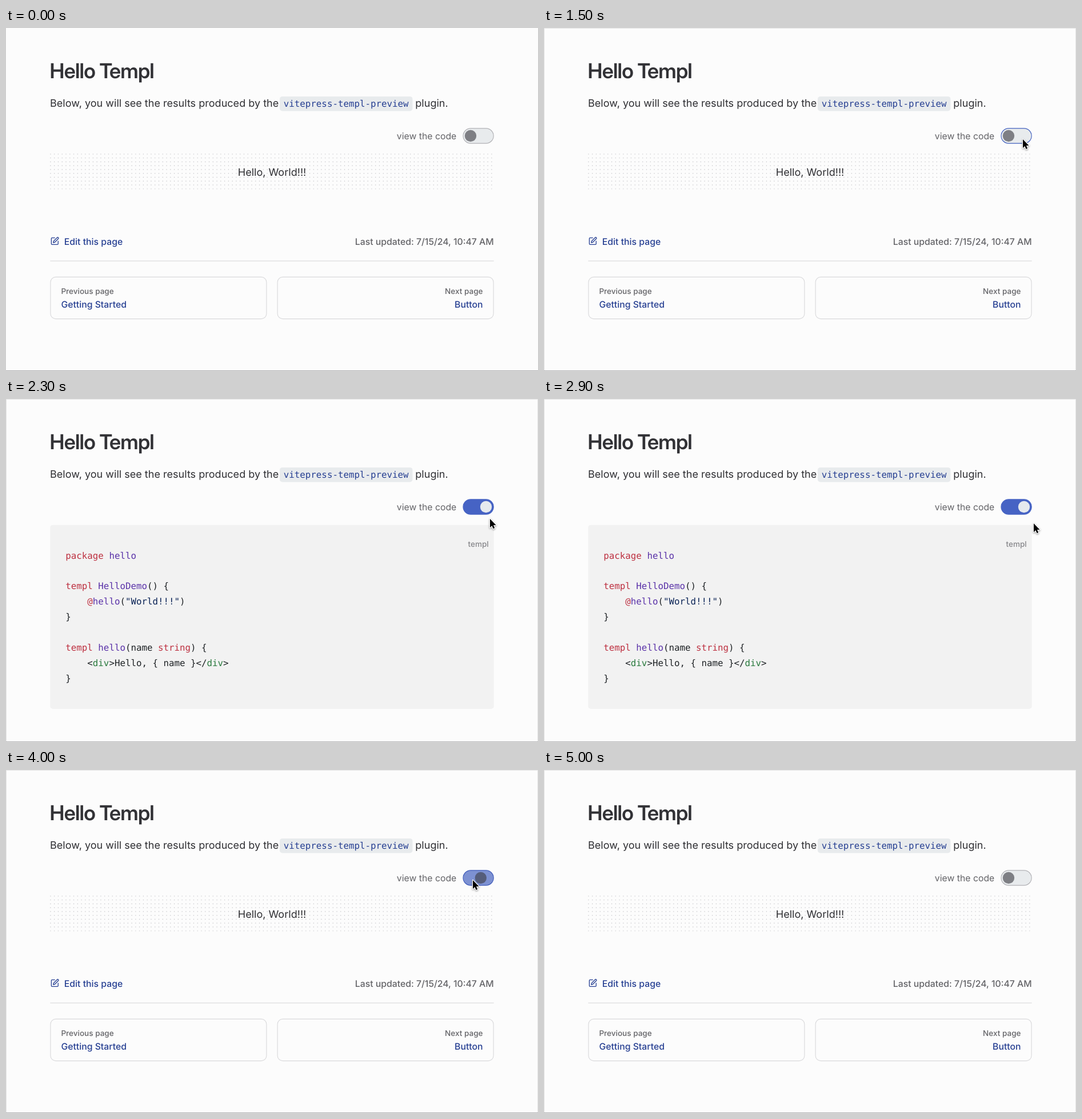
Recreate the animation shown at these times as an HTML page with a canvas. Size 931 px wide and 601 px high, loop 5100 ms.

```html
<!DOCTYPE html>
<html lang="en">
<head>
<meta charset="utf-8">
<title>Hello Templ</title>
<style>
  html, body { margin: 0; width: 100%; height: 100%; overflow: hidden; background: #fcfcfc; }
  canvas { position: absolute; left: 0; top: 0; display: block; }
  h1 {
    position: absolute; left: 76.6px; top: 52.8px; margin: 0; white-space: nowrap;
    font: 600 36.1px/45.1px "Inter Display", Inter, sans-serif;
    font-variation-settings: "opsz" 32;
    letter-spacing: -0.02em; color: #323236; text-rendering: geometricPrecision;
  }
</style>
</head>
<body>
<canvas id="stage" width="931" height="601"></canvas>
<h1>Hello Templ</h1>
<script>
const ctx = document.getElementById('stage').getContext('2d');
const LOOP = 5100, STEP = 100;
const ZOOM = 1.1286;               // page zoom applied to CSS sizes
const LEFT = 77.3, RIGHT = 853.7;

const SANS = 'Inter, sans-serif';
const MONO = '"DejaVu Sans Mono", monospace';
const C = {
  page: '#fcfcfc', text: '#2f2f33', muted: '#636367', brand: '#263f92',
  line: '#d9d9db', soft: '#e8ebed', panel: '#f2f2f2', label: '#86868a',
  red: '#bd3040', purple: '#5a32a8', navy: '#0a2356', green: '#2a7a3e', ink: '#1f2326'
};

// Each line: optional indent, then colour/text pairs
const CODE = [
  [0, 'red', 'package', 'purple', ' hello'],
  [0],
  [0, 'red', 'templ', 'purple', ' HelloDemo', 'ink', '() {'],
  [4, 'red', '@', 'purple', 'hello', 'ink', '(', 'navy', '"World!!!"', 'ink', ')'],
  [0, 'ink', '}'],
  [0],
  [0, 'red', 'templ', 'purple', ' hello', 'ink', '(name ', 'red', 'string', 'ink', ') {'],
  [4, 'ink', '<', 'green', 'div', 'ink', '>Hello, { name }</', 'green', 'div', 'ink', '>'],
  [0, 'ink', '}']
];

// Pointer routes: [time, x, y]; hidden outside each route
const ROUTES = [
  [[500, 870, 546], [600, 862, 380], [700, 857, 246], [900, 857, 246], [1000, 857, 210],
   [1200, 843, 199], [1500, 838, 195], [2000, 838, 195], [2100, 840, 198], [2300, 847, 210],
   [2400, 857, 218], [3000, 857, 218]],
  [[3500, 857, 211], [3600, 834, 202], [3700, 826, 197], [4000, 817, 193],
   [4200, 822, 192], [4300, 900, 193]]
];

const lerp = (a, b, k) => a + (b - a) * k;
const mix = (a, b, k) => `rgb(${a.map((v, i) => Math.round(lerp(v, b[i], k)))})`;

// CSS "ease": cubic-bezier(.25, .1, .25, 1)
function ease(x) {
  if (x <= 0) return 0;
  if (x >= 1) return 1;
  const bez = (p, q, s) => 3 * p * s * (1 - s) ** 2 + 3 * q * s * s * (1 - s) + s ** 3;
  let lo = 0, hi = 1;
  for (let i = 0; i < 20; i++) {
    const mid = (lo + hi) / 2;
    if (bez(.25, .25, mid) < x) lo = mid; else hi = mid;
  }
  return bez(.1, 1, lo);
}

function text(str, x, y, size, color, weight = 400, align = 'left', family = SANS) {
  ctx.font = `${weight} ${size * ZOOM}px ${family}`;
  ctx.textAlign = align;
  ctx.fillStyle = color;
  ctx.fillText(str, x, y);
}

function box(x, y, w, h, r, fill, stroke) {
  ctx.beginPath();
  ctx.roundRect(x, y, w, h, r);
  if (fill) { ctx.fillStyle = fill; ctx.fill(); }
  if (stroke) { ctx.strokeStyle = stroke; ctx.lineWidth = 1.13; ctx.stroke(); }
}

function disc(x, y, r, fill) {
  ctx.beginPath();
  ctx.arc(x, y, r, 0, 7);
  ctx.fillStyle = fill;
  ctx.fill();
}

function drawIntro() {
  text('Below, you will see the results produced by the', 77, 138.3, 16, C.text);
  box(479, 120, 232.5, 25.4, 4.5, C.soft);
  text('vitepress-templ-preview', 485.8, 138.2, 14, C.brand, 400, 'left', MONO);
  text('plugin.', 716.3, 138.3, 16, C.text);
  text('view the code', 788.3, 195.2, 14, C.muted, 400, 'right');
}

function drawToggle(on, lit, hover) {
  const off = [232, 235, 237], blue = [70, 99, 196];
  const edge = hover ? mix([66, 96, 190], [62, 88, 184], on) : mix([178, 178, 182], blue, on);
  box(800, 175.9, 53.2, 26.2, 13.1, mix(off, blue, on), on === 1 ? mix(off, blue, 1) : edge);
  disc(lerp(813, 840, on), 189, 10.2, lit ? 'rgba(255,255,245,.86)' : 'rgba(60,60,67,.616)');
}

const editIcon = new Path2D(
  'M12 3H5a2 2 0 0 0-2 2v14a2 2 0 0 0 2 2h14a2 2 0 0 0 2-2v-7' +
  'M18.4 2.6a1 1 0 0 1 3 3l-9 9a2 2 0 0 1-.9.5l-2.9.9a.5.5 0 0 1-.6-.6l.9-2.9a2 2 0 0 1 .5-.9z');

function drawPreview() {
  const gap = 6 * ZOOM;
  for (let row = 0; row < 10; row++)
    for (let col = 0; col < 115; col++)
      disc(77.9 + col * gap, 220.9 + row * gap, .7, '#bfbfc3');
  text('Hello, World!!!', 465.5, 258.8, 16, C.text, 400, 'center');

  ctx.save();
  ctx.translate(77.4, 365.6);
  ctx.scale(.658, .658);
  ctx.lineWidth = 2;
  ctx.lineCap = ctx.lineJoin = 'round';
  ctx.strokeStyle = C.brand;
  ctx.stroke(editIcon);
  ctx.restore();
  text('Edit this page', 101.8, 380.2, 14, C.brand, 500);
  text('Last updated: 7/15/24, 10:47 AM', RIGHT, 380.2, 14, C.muted, 500, 'right');

  ctx.fillStyle = C.line;
  ctx.fillRect(LEFT, 407.6, RIGHT - LEFT, 1.13);
  box(77.9, 436.4, 378, 73.2, 9, null, C.line);
  box(475.1, 436.4, 378, 73.2, 9, null, C.line);
  text('Previous page', 96.4, 465.8, 12, C.muted, 500);
  text('Getting Started', 96.4, 489.6, 14, C.brand, 500);
  text('Next page', 834.5, 465.8, 12, C.muted, 500, 'right');
  text('Button', 834.5, 489.6, 14, C.brand, 500, 'right');
}

function drawCode() {
  box(LEFT, 220.7, RIGHT - LEFT, 322.2, 4.5, C.panel);
  text('templ', 844.7, 259.4, 12, C.label, 500, 'right');
  CODE.forEach(([indent, ...parts], i) => {
    ctx.font = `400 ${14 * ZOOM}px ${MONO}`;
    const advance = ctx.measureText('0').width;
    let col = indent;
    for (let p = 0; p < parts.length; p += 2) {
      text(parts[p + 1], 104.3 + col * advance, 279.7 + i * 23.8 * ZOOM, 14,
        C[parts[p]], 400, 'left', MONO);
      col += parts[p + 1].length;
    }
  });
}

function drawFrame(focused) {
  ctx.fillStyle = focused ? '#b2b2b4' : '#a8a8aa';
  ctx.fillRect(0, 600, 931, 1);
  if (!focused) return;
  ctx.fillStyle = '#e4e4e5';
  ctx.fillRect(0, 0, 931, 1);
  ctx.fillRect(0, 0, 1, 600);
  ctx.fillRect(930, 0, 1, 600);
}

function pointerAt(t) {
  for (const route of ROUTES) {
    for (let i = 1; i < route.length; i++) {
      const [t0, x0, y0] = route[i - 1], [t1, x1, y1] = route[i];
      if (t < t0 || t > t1) continue;
      const k = (t - t0) / (t1 - t0);
      return [lerp(x0, x1, k), lerp(y0, y1, k)];
    }
  }
  return null;
}

const arrow = new Path2D('M0 0V15.2L3.4 11.9 5.7 17.2 8.2 16.1 6 10.9H10.6Z');

function drawPointer(x, y) {
  ctx.save();
  ctx.translate(x, y);
  ctx.lineJoin = 'round';
  ctx.lineWidth = 2.4;
  ctx.strokeStyle = '#fff';
  ctx.shadowColor = 'rgba(0,0,0,.4)';
  ctx.shadowBlur = 3;
  ctx.shadowOffsetY = 1.2;
  ctx.stroke(arrow);
  ctx.shadowColor = 'transparent';
  ctx.fillStyle = '#000';
  ctx.fill(arrow);
  ctx.restore();
}

function render(now) {
  const t = Math.floor((now % LOOP) / STEP) * STEP;
  const lit = t >= 1900 && t < 4000;
  const on = ease((t - 1845) / 250) - ease((t - 3945) / 250);
  const hover = (t >= 1200 && t < 2200) || (t >= 3600 && t < 4300);

  ctx.fillStyle = C.page;
  ctx.fillRect(0, 0, 931, 601);
  ctx.textRendering = 'geometricPrecision';
  drawIntro();
  drawToggle(on, lit, hover);
  if (lit) drawCode(); else drawPreview();
  drawFrame(t >= 1200);
  const pointer = pointerAt(t);
  if (pointer) drawPointer(...pointer);
  requestAnimationFrame(render);
}
requestAnimationFrame(render);
</script>
</body>
</html>
```
